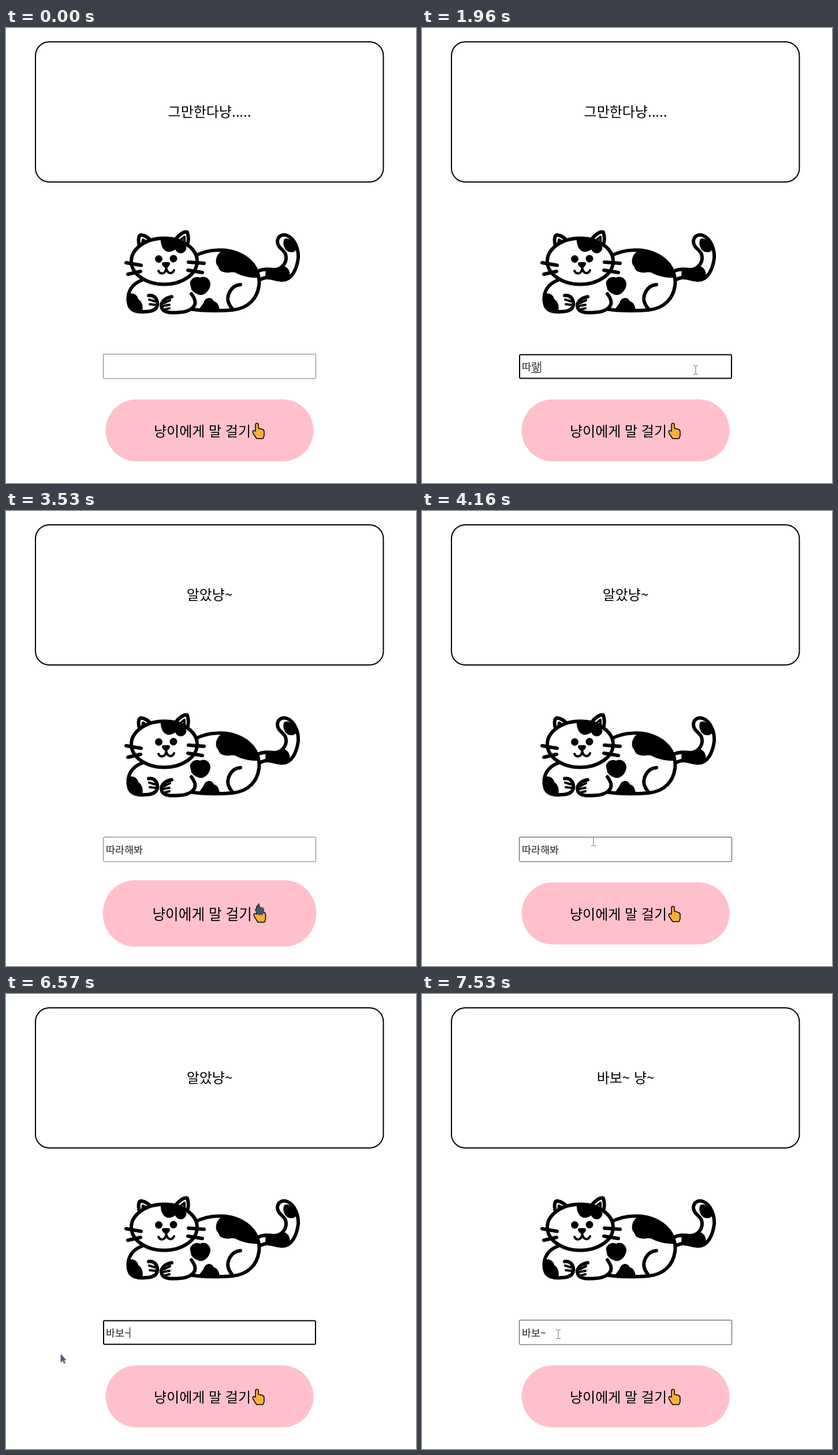
These frames come from a looping animation (710x789 px, 8 s). An HTML page:

```html
<!DOCTYPE html>
<html lang="ko">
<head>
<meta charset="utf-8">
<style>
  html, body { margin: 0; width: 710px; height: 789px; overflow: hidden; background: #fff; }
  svg { display: block; }
  text { font: 24px "Noto Sans CJK KR", "Noto Sans CJK", sans-serif; }
  #typed { font-size: 17.4px; font-weight: 300; }
  #cat { fill: none; stroke: #000; stroke-width: 6; stroke-linecap: round; stroke-linejoin: round; }
  #cat .white { fill: #fff; }
  #cat .spot { fill: #000; stroke: none; }
  #cat .thin { stroke-width: 4; }
  #pointers > * { stroke-linejoin: round; }
</style>
</head>
<body>
<svg width="710" height="789" viewBox="0 0 710 789">
  <rect x="51" y="24" width="602.5" height="243" rx="24" fill="#fff" stroke="#000" stroke-width="2"/>
  <text id="reply" x="352.5" y="154" text-anchor="middle"></text>

  <g id="cat">
    <!-- tail -->
    <path class="white" d="M436 422C446 416 459 419 467 419C480 417 488 404 484 392C481 384 470 381 470 370C471 360 479 357 487 360C500 365 507 384 506 399C504 416 496 436 480 437C467 438 455 428 441 436"/>
    <path class="spot" d="M450 416C462 421 474 418 482 413C490 416 493 424 491 434C479 444 463 434 449 432ZM482 366C489 362 500 370 504 382C501 390 491 391 485 385C480 379 479 371 482 366Z"/>
    <!-- body -->
    <path class="white" d="M328 395C350 383 384 381 408 394C429 405 441 425 438 447C435 468 421 486 392 489C366 491 342 491 318 487L255 460Z"/>
    <path class="spot" d="M374 386C402 380 435 402 440 433C423 434 407 430 397 424C389 422 384 426 376 423C368 421 370 416 365 411C361 402 366 391 374 386Z"/>
    <path class="spot" d="M336 433C329 429 318 434 318 446C319 455 330 463 338 463C347 462 354 452 354 444C353 434 344 429 336 433Z"/>
    <path class="spot" d="M334 491C335 483 341 481 343 474C347 466 357 466 360 474C366 475 370 482 370 492Z"/>
    <path d="M406 445C390 446 379 465 387 480L391 486"/>
    <!-- front legs -->
    <path class="white" stroke="none" d="M236 437C204 448 206 490 226 491L312 491L326 475L318 440Z"/>
    <path class="white" d="M236 437C219 443 209 457 212 476C214 490 226 493 240 492C255 492 264 487 262 475C260 466 254 463 247 464"/>
    <path class="spot" d="M210 462C220 457 228 463 229 470C236 474 238 484 236 492C222 494 209 486 210 462Z"/>
    <path class="white" d="M287 466C274 468 266 478 270 486C273 495 290 494 301 493C319 492 330 483 327 472Q325 466 321 461"/>
    <path class="thin" d="M248 471L258 474M249 479L259 480M284 472L274 477M283 480L272 482M283 486L275 488"/>
    <!-- head -->
    <path class="white" d="M231 377C228 366 230 358 235 359C241 360 247 364 251 369M293 367C300 358 309 352 314 354C316 361 317 370 313 378"/>
    <path class="thin" d="M236 373L237 367L243 370M303 367L309 362L309 371"/>
    <ellipse class="white" cx="274" cy="404.5" rx="57" ry="40"/>
    <path class="spot" d="M268 364C267 374 271 387 281 388C287 388 290 386 293 384C297 392 306 393 311 386C314 381 312 375 306 371C296 365 282 362 268 364Z"/>
    <circle class="spot" cx="264.5" cy="400.5" r="6.5"/>
    <circle class="spot" cx="290" cy="400" r="6.5"/>
    <path class="spot" d="M272 406H282Q286 408 282 413L277.500 418L272 413Q268 408 272 406Z"/>
    <path class="thin" d="M264 421C267 428 276 427 277.500 417C280 427 288 427 291 420"/>
    <path d="M208 407L234 411.500M211 427L233 422M316 406L343 408M315 420L340 424"/>
  </g>

  <rect id="field" fill="#fff"/>
  <rect id="selection" y="576" height="22" fill="#0078d7"/>
  <text id="typed" x="173" y="593.500"></text>
  <path id="underline" stroke="#000"/>
  <path id="caret" stroke="#000"/>

  <g id="button">
    <rect x="172.500" y="644" width="360" height="107.500" rx="53.750" fill="#ffc0cb"/>
    <text x="256" y="708">냥이에게 말 걸기</text>
    <path d="M432 699V688Q432 685.500 434.500 685.500T437 688V694L444 696Q447 697 447 700V707L445 712H434L428 703Q426 699 429 698Z" fill="#f7ae38" stroke="#000" stroke-width="1.500" stroke-linejoin="round"/>
  </g>

  <g id="pointers">
    <circle id="press" r="14" fill="#ffe62e" opacity=".7"/>
    <path id="beam" d="M-4-7.500H-1L0-6.500L1-7.500H4M0-6.500V6.500M-4 7.500H-1L0 6.500L1 7.500H4" fill="none" stroke="#5a6470"/>
    <path id="arrow" d="M.5 0V15.500L4 12L6.500 17L9 16L6.500 11H10.500Z" fill="#41597a" stroke="#a9b2bd" stroke-width=".8"/>
    <path id="hand" d="M0 12V3Q0 1 1.500 1T3 3V7L9 8Q10.500 9 10.500 11V15L8 20H1L-5 12Q-5 9-3 10Z" fill="#46566e" stroke="#26303e" stroke-width=".8"/>
  </g>
</svg>
<script>
const LOOP = 8000, TEXT_X = 173, GLYPH = 16, BLINK = 530;
const el = Object.fromEntries([...document.querySelectorAll('[id]')].map(e => [e.id, e]));

const replies = [[0, '그만한다냥.....'], [3500, '알았냥~'], [7200, '바보~ 냥~']];

// A trailing underscore marks a syllable still being composed.
const typing = [
  [0, ''], [1560, 'ㄸ_'], [1690, '따_'], [1760, '딸_'], [1830, '따라_'], [1960, '따랗_'],
  [2100, '따라해_'], [2220, '따라햅_'], [2360, '따라해보_'], [2420, '따라해봐_'],
  [5490, 'ㅂ_'], [5590, '바_'], [5690, '밥_'], [5820, '바보_'], [6170, '바보~']
];

const focusSpans = [[760, 3400], [4440, 7050]];
const pressSpans = [[730, 830], [3400, 3480], [4440, 4840], [7050, 7180]];
const hoverSpans = [[3160, 3400], [3480, 3600], [6800, 7050], [7180, 7400]];

const trips = [
  [[70, 613, 721], [250, 560, 660], [480, 474, 593], [2990, 474, 593], [3150, 450, 655],
   [3230, 436, 680], [3560, 436, 680], [3740, 347, 590], [3810, 338, 588], [4160, 297, 573],
   [4370, 297, 573], [4440, 262, 586], [4770, 81, 605], [4840, 81, 605]],
  [[6570, 94, 624], [6640, 105, 632], [6980, 271, 700], [7320, 271, 700], [7530, 236, 590], [LOOP, 236, 590]]
];
const squash = [[0, 1, 1], [100, 1.053, 1.14], [200, 1.12, 1.08], [300, 1.1, 1.1], [LOOP, 1.1, 1.1]];

const latest = (list, t) => list.filter(([start]) => start <= t).pop();
const spanAt = (spans, t) => spans.find(([a, b]) => t >= a && t < b);
const mix = (a, b, k) => a + (b - a) * k;
const show = (node, on) => node.style.display = on ? '' : 'none';
const set = (node, attrs) => { for (const k in attrs) node.setAttribute(k, attrs[k]); };

function follow(keys, t) {
  const i = keys.findIndex(([time]) => time > t);
  if (i < 1) return null;
  const [a, b] = [keys[i - 1], keys[i]], k = (t - a[0]) / (b[0] - a[0]);
  return [mix(a[1], b[1], k), mix(a[2], b[2], k)];
}

function buttonScale(t) {
  const span = latest(hoverSpans, t);
  if (!span) return [1, 1];
  const size = follow(squash, Math.min(t, span[1]) - span[0]);
  const left = 1 - Math.min(1, Math.max(0, (t - span[1]) / 60));
  return size.map(s => mix(1, s, left));
}

function drawPointer(t, pos, dragging) {
  show(el.pointers, pos);
  if (!pos) return false;
  const [x, y] = pos;
  const overField = x > 168 && x < 537 && y > 565 && y < 609;
  const overButton = x > 172 && x < 533 && y > 644 && y < 752;
  const beam = overField || dragging;
  set(el.pointers, { transform: `translate(${x} ${y})` });
  show(el.press, spanAt(pressSpans, t));
  show(el.beam, beam);
  show(el.hand, overButton && !beam);
  show(el.arrow, !overButton && !beam);
  return overField;
}

function drawField(t, pos, hovered) {
  const focus = spanAt(focusSpans, t);
  set(el.field, focus
    ? { x: 169, y: 566.5, width: 367, height: 41, rx: 2, stroke: '#000', 'stroke-width': 2 }
    : { x: 168.5, y: 565.5, width: 368, height: 42.5, rx: 1.5, stroke: hovered ? '#444' : '#767676', 'stroke-width': 1 });

  const [typedAt, raw] = latest(typing, t);
  const value = raw.replace('_', '');
  if (el.typed.textContent !== value) el.typed.textContent = value;
  const end = TEXT_X + (value ? el.typed.getComputedTextLength() : 0);

  const selecting = t >= 4440 && t < 5490;
  const from = selecting ? Math.max(TEXT_X, pos ? pos[0] : 0) : end;
  const selected = from < end;
  show(el.selection, selected);
  if (selected) set(el.selection, { x: from, width: end - from });
  set(el.typed, { fill: selected && from < end - GLYPH * 2 ? '#fff' : '#222' });

  show(el.underline, focus && raw.endsWith('_') && !selecting);
  set(el.underline, { d: `M${end - GLYPH} 597.5H${end}` });

  const since = focus ? t - Math.max(typedAt, focus[0] === 760 ? 770 : focus[0]) : 0;
  show(el.caret, focus && !selected && Math.floor(since / BLINK) % 2 === 0);
  set(el.caret, { d: `M${Math.floor(end) + .5} 578V597` });
}

function frame(now) {
  const t = now % LOOP;
  const pos = trips.map(trip => follow(trip, t)).find(Boolean);
  const hovered = drawPointer(t, pos, t >= 4440 && t < 4840);
  drawField(t, pos, hovered);
  el.reply.textContent = latest(replies, t)[1];
  const [sx, sy] = buttonScale(t);
  set(el.button, { transform: `translate(352.5 697.75) scale(${sx} ${sy}) translate(-352.5 -697.75)` });
}

const start = performance.now();
function tick() {
  frame(performance.now() - start);
  requestAnimationFrame(tick);
}
tick();
</script>
</body>
</html>
```
